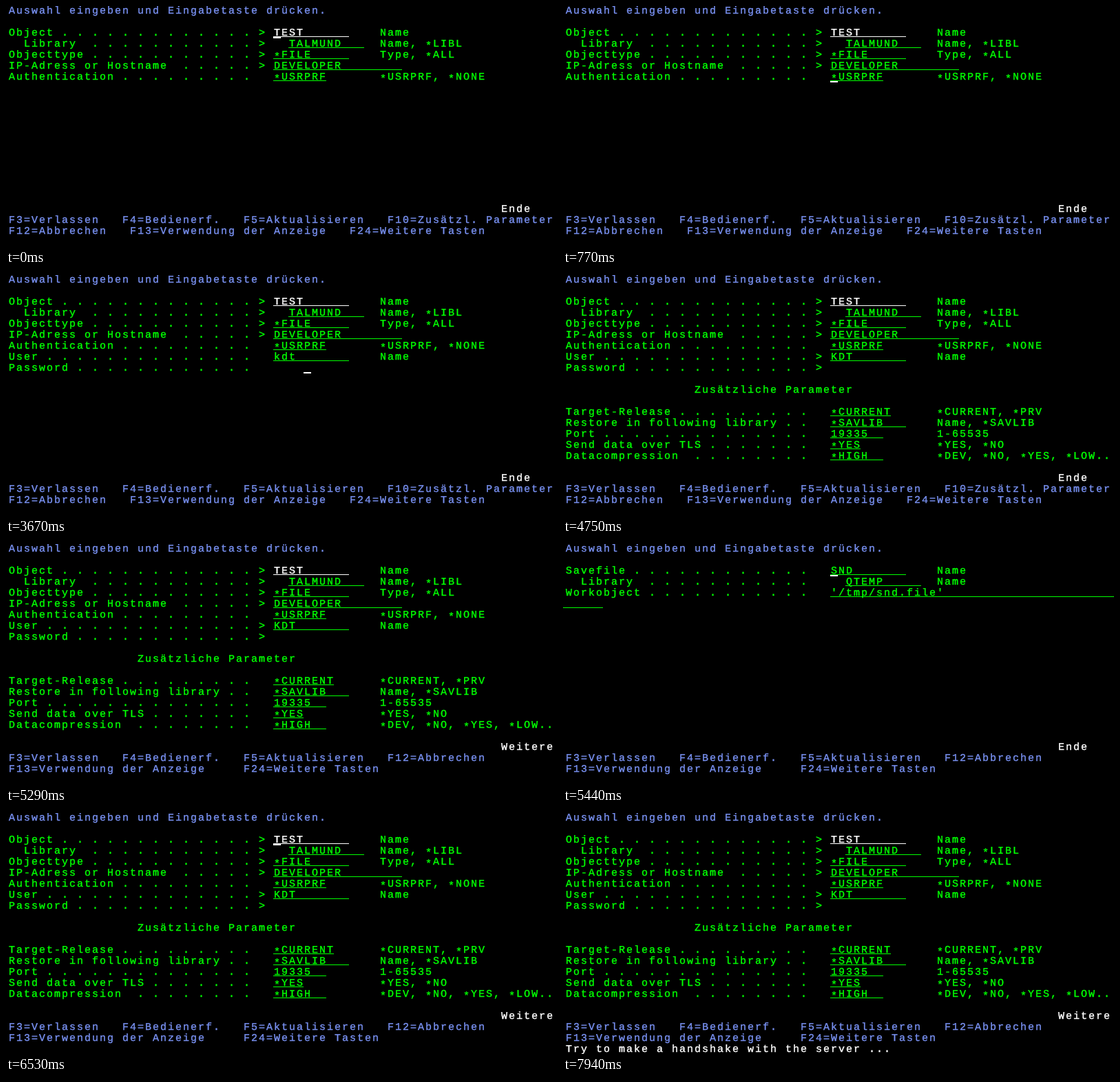
Recreate the animation shown at these times as an HTML page. Size 800 by 350 pixels, loop 8000 ms.

```html
<!DOCTYPE html>
<html lang="de">
<head>
<meta charset="utf-8">
<style>
html, body { margin: 0; width: 100%; height: 100%; overflow: hidden; background: #000; }
svg { display: block; width: 800px; height: 350px; }
text {
  font: 15px "Liberation Mono", monospace;
  white-space: pre;
  fill: currentColor;
  stroke: currentColor;
  stroke-width: .4px;
  text-rendering: geometricPrecision;
}
rect { fill: currentColor; shape-rendering: crispEdges; }
.green { color: #0f0; }
.blue { color: #7890f0; }
.white { color: #fff; }
</style>
</head>
<body>
<svg id="screen" viewBox="0 0 800 350"></svg>
<script>
const LOOP = 8000, CW = 11, CH = 16, LEFT = 3;
const VALUE = 35, HINT = 49;
const svg = document.getElementById('screen');

function add(parent, tag, attrs = {}) {
  const el = document.createElementNS('http://www.w3.org/2000/svg', tag);
  for (const k in attrs) el.setAttribute(k, attrs[k]);
  return parent.appendChild(el);
}

// Places each character in its terminal cell; asterisks sit lower.
function setText(el, col, row, str) {
  const chars = [...str];
  el.setAttribute('x', chars.map((_, i) => LEFT + 1 + (col + i) * CW).join(' '));
  el.setAttribute('y', chars.map(c => row * CH + 11 + (c === '*' ? 3 : 0)).join(' '));
  el.textContent = str;
}

function print(parent, col, row, str, color = 'green') {
  const el = add(parent, 'text', { class: color });
  setText(el, col, row, str);
  return el;
}

function line(parent, x, row, width, color = 'green') {
  add(parent, 'rect', { class: color, x, y: row * CH + 12, width, height: 1 });
}

function label(parent, row, str) {
  let s = str;
  for (let c = str.length + 1; c <= 31; c++) if (c % 2) s = s.padEnd(c) + '.';
  print(parent, 0, row, s);
}

function field(parent, row, name, value, len, hint = '', o = {}) {
  const col = VALUE + (o.indent || 0);
  label(parent, row, name);
  if (o.mark) print(parent, 33, row, '>');
  if (len) line(parent, LEFT + col * CW, row, len * CW, o.color);
  if (hint) print(parent, HINT, row, hint);
  return print(parent, col, row, value, o.color);
}

const group = () => add(svg, 'g');
const mark = true;

print(svg, 0, 0, 'Auswahl eingeben und Eingabetaste drücken.', 'blue');

const main = group();
field(main, 2, 'Object', 'TEST', 10, 'Name', { mark, color: 'white' });
field(main, 3, '  Library', 'TALMUND', 10, 'Name, *LIBL', { mark, indent: 2 });
field(main, 4, 'Objecttype', '*FILE', 10, 'Type, *ALL', { mark });
field(main, 5, 'IP-Adress or Hostname', 'DEVELOPER', 17, '', { mark });
field(main, 6, 'Authentication', '*USRPRF', 7, '*USRPRF, *NONE');

const login = group();
const user = field(login, 7, 'User', '', 10, 'Name');
field(login, 8, 'Password', '', 0);

const extra = group();
print(extra, 33, 7, '>');
print(extra, 33, 8, '>');
print(extra, 17, 10, 'Zusätzliche Parameter');
field(extra, 12, 'Target-Release', '*CURRENT', 8, '*CURRENT, *PRV');
field(extra, 13, 'Restore in following library', '*SAVLIB', 10, 'Name, *SAVLIB');
field(extra, 14, 'Port', '19335', 7, '1-65535');
field(extra, 15, 'Send data over TLS', '*YES', 4, '*YES, *NO');
field(extra, 16, 'Datacompression', '*HIGH', 7, '*DEV, *NO, *YES, *LOW..');

const second = group();
field(second, 2, 'Savefile', 'SND', 10, 'Name');
field(second, 3, '  Library', 'QTEMP', 10, 'Name', { indent: 2 });
field(second, 4, 'Workobject', "'/tmp/snd.file'", 0);
line(second, 388, 4, 412);
line(second, 0, 5, 58);

const keys = 'F3=Verlassen   F4=Bedienerf.   F5=Aktualisieren   ';
const keysLong = group();
print(keysLong, 0, 19, keys + 'F10=Zusätzl. Parameter', 'blue');
print(keysLong, 0, 20, 'F12=Abbrechen   F13=Verwendung der Anzeige   F24=Weitere Tasten', 'blue');
const keysShort = group();
print(keysShort, 0, 19, keys + 'F12=Abbrechen', 'blue');
print(keysShort, 0, 20, 'F13=Verwendung der Anzeige     F24=Weitere Tasten', 'blue');

const end = print(svg, 65, 18, 'Ende', 'white');
const more = print(svg, 65, 18, 'Weitere', 'white');
const status = print(svg, 0, 21, 'Try to make a handshake with the server ...', 'white');
const cursor = add(svg, 'rect', { class: 'white', width: CW, height: 2 });

// [start, column, row]; without a position the cursor is hidden.
const cursorPath = [
  [0, 35, 2], [150], [230, 37, 3], [380, 35, 4], [540, 35, 5], [770, 35, 6],
  [1170, 35, 7], [1720], [2020, 36, 7], [2100, 37, 7], [2330, 38, 7],
  [2560, 35, 8], [3110], [3350, 37, 8], [3500, 38, 8], [3670, 39, 8],
  [3840, 40, 8], [3900, 41, 8], [4130, 42, 8], [4370, 43, 8], [4750],
  [4830, 35, 2], [5290], [5440, 35, 2], [5990], [6530, 35, 2], [7080],
  [7460, 35, 2], [7940]
];
const typed = [[0, ''], [2020, 'k'], [2100, 'kd'], [2330, 'kdt'], [4750, 'KDT']];

const at = (list, t) => list.findLast(e => e[0] <= t);
const show = (el, on) => el.setAttribute('display', on ? 'inline' : 'none');

function update(t) {
  const page2 = t >= 5440 && t < 6450;
  const short = t >= 4830;
  show(main, !page2);
  show(login, !page2 && t >= 1170);
  show(extra, !page2 && t >= 4750);
  show(second, page2);
  show(keysLong, !short);
  show(keysShort, short);
  show(end, page2 || !short);
  show(more, short && !page2);
  show(status, t >= 7460);

  const name = at(typed, t)[1];
  if (user.textContent !== name) setText(user, VALUE, 7, name);

  const [, col, row] = at(cursorPath, t);
  show(cursor, row !== undefined);
  if (row !== undefined) {
    cursor.setAttribute('x', LEFT + col * CW);
    cursor.setAttribute('y', row * CH + 13);
  }
}

const start = performance.now();
function tick() {
  update((performance.now() - start) % LOOP);
  requestAnimationFrame(tick);
}
update(0);
requestAnimationFrame(tick);
</script>
</body>
</html>
```
